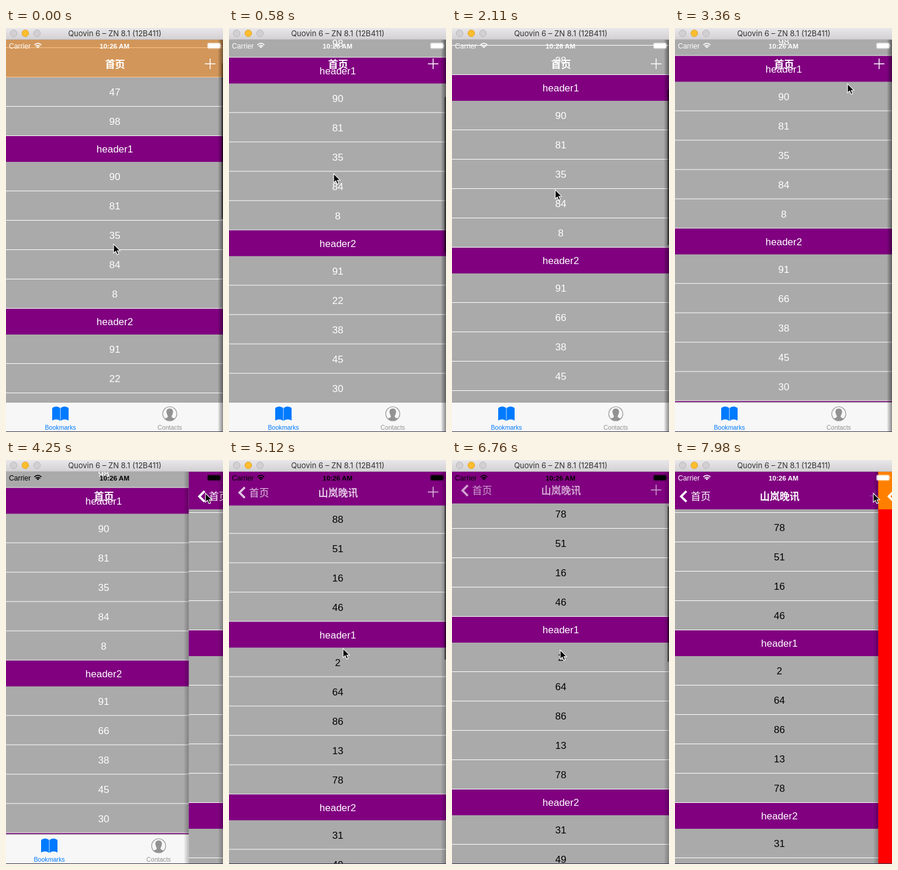
Recreate the animation shown at these times as an HTML page. Size 371 by 688 pixels, loop 8000 ms.

```html
<!DOCTYPE html>
<html lang="en">
<head>
<meta charset="utf-8">
<title>Fading navigation bar</title>
<style>
html, body { margin: 0; width: 100%; height: 100%; overflow: hidden; background: #aaa; }
svg { display: block; width: 371px; height: 688px; }
text { font-family: "Liberation Sans", Arial, sans-serif; font-size: 17px; text-anchor: middle; }
.cjk { font-family: "Noto Sans CJK SC", "Noto Sans CJK", sans-serif; }
.bold { font-weight: bold; }
.window { font: 13px Inter, "Open Sans", sans-serif; }
.small { font-size: 10.6px; }
.status { font-size: 12.2px; text-anchor: start; }
.time { font-size: 11.7px; font-weight: bold; }
</style>
</head>
<body>
<svg viewBox="0 0 371 688">
  <defs>
    <linearGradient id="chrome" x2="0" y2="1">
      <stop stop-color="#e9e7e9"/><stop offset="1" stop-color="#d2d0d2"/>
    </linearGradient>
    <linearGradient id="edge">
      <stop stop-opacity="0"/><stop offset="1" stop-opacity=".25"/>
    </linearGradient>
    <clipPath id="screen"><rect y="20" width="371" height="667"/></clipPath>
    <path id="plus" d="M340 61H358M349 52V70" fill="none" stroke="#fff" stroke-width="1.5"/>
    <path id="back" d="M27 53L18 62L27 71" fill="none" stroke="#fff" stroke-width="3.8"/>
    <rect id="shade" x="-9" y="20" width="9" height="667" fill="url(#edge)"/>
    <rect id="thumb" x="368.5" width="2.5" height="265" rx="1.2"/>
  </defs>

  <g clip-path="url(#screen)">
    <g id="home">
      <rect y="20" width="371" height="668" fill="#aaa"/>
      <g id="homeList"></g>
      <use id="homeThumb" href="#thumb"/>
      <rect id="homeNav" y="20" width="371" height="64" fill="#ff8000"/>
      <text class="cjk bold" x="186.5" y="68" fill="#fff">首页</text>
      <use id="homePlus" href="#plus"/>
      <rect y="637" width="371" height="51" fill="#f7f7f7"/>
      <rect y="637" width="371" height="1" fill="#a5a5a5"/>
      <path fill="#007aff" d="M79 647Q86 642 92.6 647V669Q86 664.5 79 668.5ZM107 647Q100 642 93.4 647V669Q100 664.5 107 668.5Z"/>
      <g fill="#929292">
        <circle cx="280" cy="657" r="12" fill="none" stroke="#929292" stroke-width="1.2"/>
        <path d="M280 648C284.5 648 286 651 285.5 655C285 658 283.5 659 283.2 662C284 664 287 664 288.5 665.5Q280 672 271.5 665.5C273 664 276 664 276.8 662C276.5 659 275 658 274.5 655C274 651 275.5 648 280 648Z"/>
      </g>
      <text class="small" x="93" y="683.5" fill="#007aff">Bookmarks</text>
      <text class="small" x="280" y="683.5" fill="#929292">Contacts</text>
    </g>

    <g id="detail">
      <use href="#shade"/>
      <rect y="20" width="371" height="668" fill="#aaa"/>
      <g id="detailList"></g>
      <use id="detailThumb" href="#thumb"/>
      <g id="detailNav">
        <rect y="20" width="371" height="64" fill="#800080"/>
        <g id="detailItems">
          <use href="#back"/>
          <text class="cjk" x="51.5" y="68" fill="#fff">首页</text>
          <text class="cjk bold" x="186.5" y="68" fill="#fff">山岚晚讯</text>
          <use id="detailPlus" href="#plus"/>
        </g>
      </g>
    </g>

    <g id="last">
      <use href="#shade"/>
      <rect y="20" width="371" height="668" fill="red"/>
      <rect y="20" width="371" height="64" fill="#ff8000"/>
      <use href="#back"/>
    </g>

    <g id="status" fill="currentColor">
      <text class="status" x="5" y="34.5">Carrier</text>
      <path d="M48.5 28.8Q54.5 23.6 60.5 28.8M50.6 31.3Q54.5 27.8 58.4 31.3" fill="none" stroke="currentColor" stroke-width="1.7"/>
      <path d="M52.3 32.3Q54.5 30.4 56.7 32.3L54.5 34.6Z"/>
      <text class="time" x="185.5" y="34.5">10:26 AM</text>
      <rect x="344.5" y="25.5" width="22" height="9.5" rx="2" fill="none" stroke="currentColor" stroke-width=".6"/>
      <rect x="345.3" y="26.3" width="20.4" height="7.9" rx="1"/>
      <path d="M367.3 28.5Q369 30.3 367.3 32Z"/>
    </g>
  </g>

  <rect width="371" height="20" fill="url(#chrome)"/>
  <rect y="19" width="371" height="1" fill="#bdb9bd"/>
  <g fill="#d2d0d2" stroke="#b9b7b9">
    <circle cx="13" cy="9" r="5.7"/>
    <circle cx="33" cy="9" r="5.7" fill="#fdbe2d" stroke="#e2a32a"/>
    <circle cx="53" cy="9" r="5.7"/>
  </g>
  <text class="window" x="186" y="14" fill="#333">Quovin 6 – ZN 8.1 (12B411)</text>
  <rect y="687" width="371" height="1" fill="#34364c"/>
  <path id="cursor" d="M0 0V15.5L3.6 12.2L6 17.8L8.7 16.6L6.3 11.2H11Z" stroke="#fff" stroke-width="1.1"/>
</svg>

<script>
const LOOP = 8000, WIDTH = 371, ROW = 50, HEAD = 44, REST = 290;
const PUSH = 560, PUSH_DETAIL = 4110, PUSH_LAST = 7895;
const $ = id => document.getElementById(id);
const set = (el, attrs) => { for (const k in attrs) el.setAttribute(k, attrs[k]); return el; };
const clamp = v => Math.max(0, Math.min(1, v));
const ramp = (t, from, to) => clamp((t - from) / (to - from));
const ease = u => u * u * (3 - 2 * u);
const snap = v => Math.round(v * 2) / 2; // half points, as on a 2x screen
const move = (id, x, y = 0) => set($(id), { transform: `translate(${snap(x)} ${snap(y)})` });

function add(parent, tag, attrs, text = "") {
  const el = set(document.createElementNS("http://www.w3.org/2000/svg", tag), attrs);
  el.textContent = text;
  return parent.appendChild(el);
}

// y = 0 is the top of "header1"; returns the number labels
function buildList(id, ink, sections) {
  const list = $(id), cells = [];
  let y = -ROW * sections[0].split(" ").length;
  sections.forEach((rows, s) => {
    if (s) {
      add(list, "rect", { y, width: WIDTH, height: HEAD, fill: "#800080" });
      add(list, "text", { x: 186, y: y + 28, fill: "#fff" }, "header" + s);
      y += HEAD;
    }
    for (const label of rows.split(" ").filter(Boolean)) {
      cells.push(add(list, "text", { x: 186, y: y + 31, fill: ink }, label));
      y += ROW;
      add(list, "rect", { y: y - 1, width: WIDTH, height: 1, fill: "#fff" });
    }
  });
  return cells;
}

const homeCells = buildList("homeList", "#fff",
  ["12 74 69 86 98", "90 81 35 84 8", "91 66 38 45 30", ""]);
const detailCells = buildList("detailList", "#000",
  ["27 78 51 16 46", "2 64 86 13 78", "31 49 7 53 90"]);

// Eased value of one column between rows of [time, ...values]
function tween(t, keys, col = 1) {
  const next = keys.findIndex(k => k[0] > t);
  if (next < 1) return keys[next ? keys.length - 1 : 0][col];
  const a = keys[next - 1], b = keys[next];
  return a[col] + (b[col] - a[col]) * ease(ramp(t, a[0], b[0]));
}

// Turning points of each list
const homeDrag = [[0, 184], [554, 50], [1500, 303], [2287, 47.5]];
const detailDrag = [[4960, REST], [5776, 145], [6220, REST], [6480, REST], [7180, 225], [7640, REST]];
// Pointer: [time, x, y beyond the dragged distance]
const pointer = [[0, 184, -106], [1150, 174, -80], [2560, 177, -99], [2930, 269, -221],
  [3170, 269, -221], [3640, 341, -281], [4250, 341, -281], [4700, 196, -3],
  [6760, 185, 9], [7400, 185, 9], [7780, 339, -281]];

const pushed = (t, start) => WIDTH * ease(ramp(t, start, start + PUSH));
const press = (t, at) => 1 - .8 * ramp(t, at, at + 120);
const thumb = (id, top, list, opacity) =>
  set($(id), { y: top - list * .43, opacity: .5 * opacity });

function draw(t) {
  const in1 = pushed(t, PUSH_DETAIL), in2 = pushed(t, PUSH_LAST);
  const home = tween(t, homeDrag), detail = tween(t, detailDrag);

  move("home", -.32 * in1);
  move("detail", WIDTH - in1 - .32 * in2);
  move("last", WIDTH - in2);

  // Reused cells get a new number while off screen
  move("homeList", 0, home);
  homeCells[2].textContent = t < 554 ? 38 : 69;
  homeCells[3].textContent = t < 554 ? 47 : 86;
  homeCells[11].textContent = t < 1500 ? 22 : 66;
  set($("homeNav"), { opacity: clamp(1 - (REST - home) / 200) });
  thumb("homeThumb", 139, home, 1 - ramp(t, 2650, 2930));
  set($("homePlus"), { opacity: press(t, 3720) });

  const hide = clamp((REST - detail) / 100);
  move("detailList", 0, detail);
  detailCells[1].textContent = t < 5776 ? 88 : 78;
  move("detailNav", 0, -44 * hide);
  set($("detailItems"), { opacity: clamp(1 - 1.6 * hide) });
  thumb("detailThumb", 193.5, detail, ramp(t, 4890, 4960) - ramp(t, 7640, 7800));
  set($("detailPlus"), { opacity: press(t, 7790) });

  set($("status"), { color: t >= PUSH_DETAIL && t < PUSH_LAST ? "#000" : "#fff" });
  move("cursor", tween(t, pointer), tween(t, pointer, 2) + home + detail);
}

function tick() {
  draw(performance.now() % LOOP);
  requestAnimationFrame(tick);
}
tick();
</script>
</body>
</html>
```
